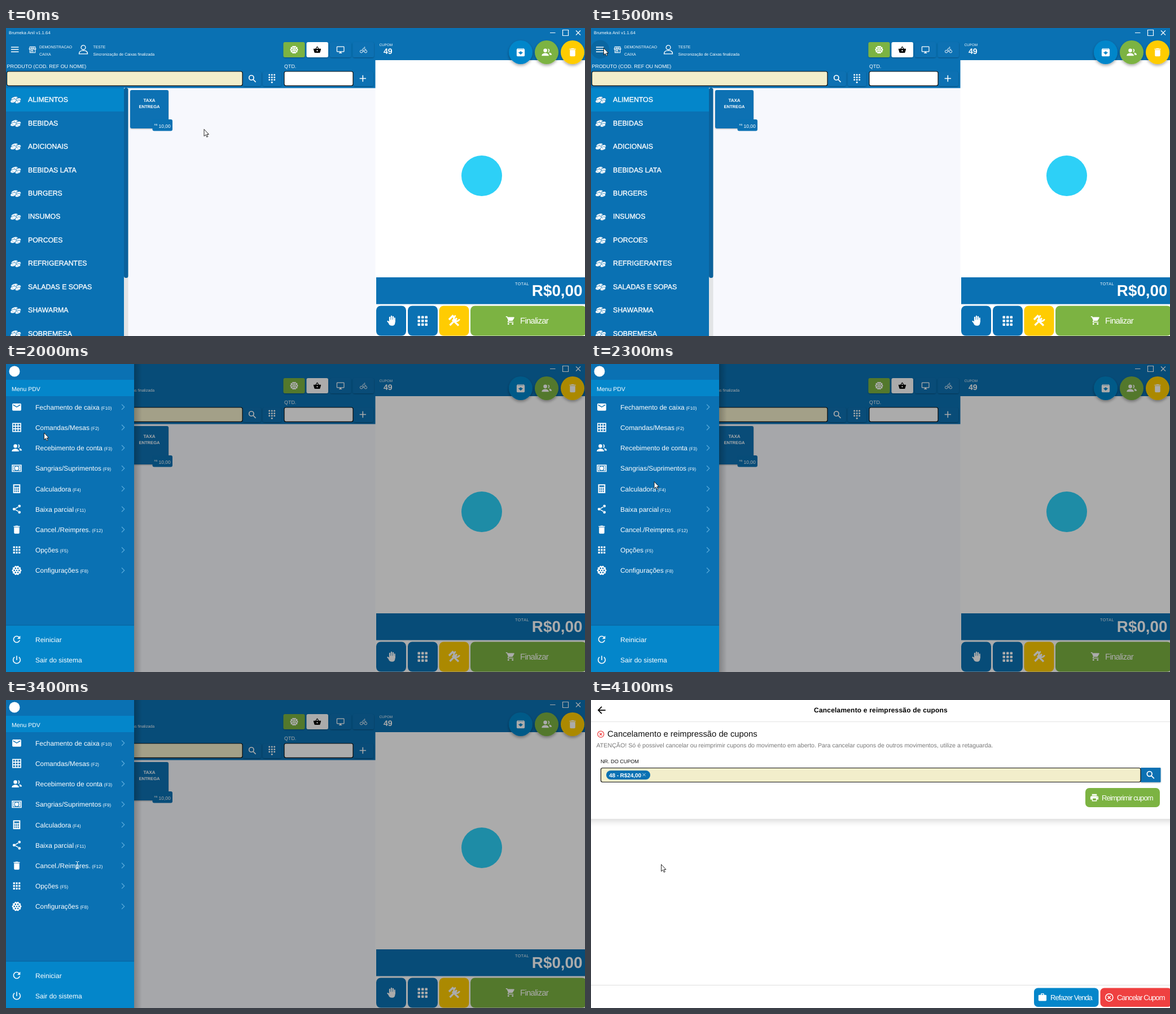
An HTML page that plays this animation: 1026 by 546 pixels, repeating every 4.8 s.

```html
<!DOCTYPE html>
<html lang="pt">
<head>
<meta charset="utf-8">
<title>PDV</title>
<style>
html, body { margin: 0; width: 100%; height: 100%; overflow: hidden; background: #fff; }
svg { display: block; width: 100%; height: 100%; font-family: "Liberation Sans", Arial, sans-serif; text-rendering: geometricPrecision; }
text { white-space: pre; }
</style>
</head>
<body>
<svg id="stage" viewBox="0 0 1026 546" xmlns="http://www.w3.org/2000/svg"></svg>
<script>
const BLUE = '#0a71b3', LIGHT = '#0486ca', GREEN = '#7cb342', YELLOW = '#ffcc02', RED = '#ef4040', CREAM = '#f2eecb';

const tag = (name, attrs, body = '') =>
  `<${name} ${Object.entries(attrs).map(([k, v]) => `${k}="${v}"`).join(' ')}>${body}</${name}>`;
const rect = (x, y, width, height, fill, rx = 0, more = {}) => tag('rect', { x, y, width, height, fill, rx, ...more });
const circle = (cx, cy, r, fill, more = {}) => tag('circle', { cx, cy, r, fill, ...more });
const line = (d, stroke, width = 1, more = {}) => tag('path', { d, stroke, 'stroke-width': width, fill: 'none', ...more });
const label = (s, x, y, size, more = {}) => tag('text', { x, y, 'font-size': size, fill: '#fff', ...more }, s);
const group = (id, body) => tag('g', { id }, body);
const range = (n, f) => Array.from({ length: n }, (_, i) => f(i));
const bold = { 'font-weight': 700 };
const middle = { 'text-anchor': 'middle' };
const raised = { filter: 'url(#raised)' };
const spaced = v => ({ 'letter-spacing': v });

// Icons live in a 24 x 24 box: [path, stroke width when outlined]
const dot = (x, y, r) => `M${x - r} ${y}a${r} ${r} 0 1 0 ${2 * r} 0a${r} ${r} 0 1 0 ${-2 * r} 0z`;
const box = (x, y, w, h) => `M${x} ${y}h${w}v${h}h${-w}z`;
const polar = (r, a) => [12 + r * Math.cos(a), 12 + r * Math.sin(a)];
const wheelEdge = 'M' + range(80, i => {
  const a = i * Math.PI / 40;
  return polar(10 + 0.8 * Math.cos(10 * a), a).map(v => v.toFixed(2)).join(' ');
}).join('L') + 'z';
const wheelHoles = range(6, i => dot(...polar(5.4, i * Math.PI / 3), 1.7)).join('');

const icons = {
  menu: ['M3 6.5h18M3 12h18M3 17.5h18', 2],
  search: [dot(9.5, 9.5, 5.5) + 'M14 14l5.8 5.8', 2.3],
  plus: ['M12 4v16M4 12h16', 2.2],
  close: ['M5 5l14 14M19 5L5 19', 2],
  mail: ['M4 4h16q2 0 2 2v12q0 2-2 2H4q-2 0-2-2V6q0-2 2-2zM20 8V6l-8 5-8-5v2l8 5z'],
  table: ['M3 3h18v18H3zM9 3v18M15 3v18M3 9h18M3 15h18', 2],
  people: [dot(9, 8, 4.2) + 'M1 20c0-4 4-6 8-6s8 2 8 6zM14.5 4a4 4 0 1 1 0 8a6 6 0 0 0 0-8zM18.6 18H23.5c0-3.5-3-4.8-6.5-5c1.2 1.2 1.8 2.6 1.6 5z'],
  cash: [box(1, 4, 22, 16) + box(3, 6, 18, 12) + 'M4 7h4q-3 5 0 10H4zM20 7h-4q3 5 0 10h4z' + dot(12, 12, 4.2)],
  calculator: [box(4, 2, 16, 20) + box(6.5, 4.5, 11, 3.5) + range(9, i => box(6.5 + i % 3 * 4, 10 + (i / 3 | 0) * 3.6, 2.6, 2.2)).join('')],
  share: [dot(18, 5, 3) + dot(6, 12, 3) + dot(18, 19, 3) + 'M8 10.3l8-4.6.9 1.6-8 4.6zM8.9 12.1l8 4.6-.9 1.6-8-4.6z'],
  trash: ['M6 7h12v12q0 2-2 2H8q-2 0-2-2zM19 4h-3.5l-1-1h-5l-1 1H5v2h14z'],
  apps: [range(9, i => box(4 + i % 3 * 6, 4 + (i / 3 | 0) * 6, 4, 4)).join('')],
  wheel: [wheelEdge + wheelHoles + dot(12, 12, 1.5)],
  refresh: ['M17.65 6.35A8 8 0 1 0 19.73 14h-2.08A6 6 0 1 1 16.22 7.78L13 11h7V4z'],
  power: ['M12 3v10M7 6a8 8 0 1 0 10 0', 2],
  basket: ['M17.2 9L12.8 2.4q-.8-.8-1.6 0L6.8 9H2q-1.2 0-1 1.3l2.6 9.2Q4 21 5.5 21h13q1.5 0 1.9-1.5L23 10.3Q23.200 9 22 9zM9 9l3-4.4L15 9z' + dot(12, 15, 2)],
  monitor: ['M3 2h18q2 0 2 2v12q0 2-2 2h-7v2h2v2H8v-2h2v-2H3q-2 0-2-2V4q0-2 2-2zM3 4v12h18V4z'],
  bike: [dot(5.5, 17, 4) + dot(18.5, 17, 4) + dot(15.5, 4.5, 1) + 'M12 18v-5l-3.500-2.500 4.500-4 3 4h4', 1.6],
  archive: ['M6 3h12l1.200.5 1.800 2.500V19q0 2-2 2H5q-2 0-2-2V6L4.800 3.500zM12 17.500l5.500-5.500H14v-2h-4v2H6.500zM5.100 5.200h13.800l-1-1.200H6z'],
  person: [dot(12, 7, 5.2) + 'M2 22c0-6 4-8 10-8s10 2 10 8z', 1.8],
  store: ['M4 3h16l2 7H2zM4 10v11h16V10M8 3v7M12 3v7M16 3v7M8 21v-7h5v7', 1.9],
  cart: [dot(7, 20, 2) + dot(17, 20, 2) + 'M1 2h3.300l.9 2H20q1.300.2.900 1.500L17.300 12q-.6 1-1.800 1H8.100L7.200 15H19v2H7q-2.800-.5-1.700-3l1.300-2.400L3 4H1z'],
  print: ['M19 8H5q-3 0-3 3v6h4v4h12v-4h4v-6q0-3-3-3zM6 3h12v4H6z' + box(8, 14, 8, 5) + dot(19, 11, 1)],
  work: ['M20 6h-4V4q0-2-2-2h-4q-2 0-2 2v2H4q-2 0-2 2v11q0 2 2 2h16q2 0 2-2V8q0-2-2-2zM10 6V4h4v2z'],
  back: ['M20 12H5.500M12 4.700L4.700 12l7.300 7.300', 2.1],
  cancel: [dot(12, 12, 8.8) + 'M8.500 8.500l7 7M15.500 8.500l-7 7', 2]
};

function icon(name, cx, cy, size, color = '#fff') {
  const [d, w] = icons[name];
  const paint = w ? { fill: 'none', stroke: color, 'stroke-width': w } : { fill: color, 'fill-rule': 'evenodd' };
  return tag('path', { d, ...paint, transform: `translate(${cx - size / 2} ${cy - size / 2}) scale(${size / 24})` });
}

const hand = tag('g', { transform: 'translate(683 519)', stroke: '#fff', 'stroke-linecap': 'round', 'stroke-width': 2.3, fill: '#fff' },
  '<path d="M-3-1v-5M0-1v-7M3-1v-6M5.700 2v-6.500M-3.500 4l-3-3" /><path d="M-3-1h8.700v4q0 5-4.500 5t-5.700-4z" stroke-width="1.500" />');

const tools = tag('g', { transform: 'translate(794 519)', fill: 'none', stroke: '#fff' },
  line('M-7.500 8L5-4.500', '#fff', 3.2) + line('M3-9a5 5 0 1 0 6.500 6', '#fff', 2.8) +
  line('M-3-2L8 8.500', '#fff', 3.2) + line('M-9-2L-2.500-8.500L1-5', '#fff', 3.4));

const loaves = y => tag('g', { transform: `translate(17 ${y})`, fill: '#fff', stroke: BLUE, 'stroke-width': 0.7 },
  [[-2, -2.7, 6, 3], [5, -0.2, 4.6, 3], [-4, 1.8, 5.4, 3.2], [4, 3.300, 5, 2.8]].map(([cx, cy, rx, ry]) =>
    tag('ellipse', { cx, cy, rx, ry, transform: `rotate(-18 ${cx} ${cy})` })).join('') +
  '<path d="M-3-4l2 2M1-4.500l1.500 2M-6 1l2 2M3 2.500l2 2" fill="none" />');

const button = (x, y, w, h, fill, r = 3) => rect(x, y, w, h, fill, r, raised);
const field = (x, y, w, h, fill) => rect(x, y, w, h, fill, 3, { stroke: '#111', 'stroke-width': 1.2 });

function topBar() {
  const search = range(10, i => circle(i < 9 ? 466.7 + i % 3 * 4.500 : 471.2, 83 + (i / 3 | 0) * 4.400, 1.500, '#fff')).join('');
  return rect(0, 0, 1026, 57, BLUE) + rect(0, 56, 654.5, 50.5, BLUE) +
    label('Brumeka Anil v1.1.64', 5, 11, 7.6, spaced(0.1)) +
    line('M964 8.500h9.500M986.500 3.500h10v10h-10zM1010 4.500l8 8M1018 4.500l-8 8', '#fff', 1.2) +
    circle(16, 38, 16.5, '#000', { id: 'hover', opacity: 0.1 }) +
    icon('menu', 15.7, 38, 18) + icon('store', 47, 38.5, 14) + icon('person', 137, 38.3, 18) +
    label('DEMONSTRACAO', 59, 36.3, 6.8) + label('CAIXA', 59, 49, 6.9) +
    label('TESTE', 154.5, 36.3, 6.8) + label('Sincronização de Caixas finalizada', 154.5, 49, 7) +
    button(491.5, 25, 38, 27, GREEN) + button(532.5, 25, 38.500, 27, '#fff') +
    button(574, 25, 37.5, 27, BLUE) + button(614.5, 25, 37.5, 27, BLUE) +
    icon('wheel', 510.5, 38.5, 16) + icon('basket', 551.5, 38.5, 14.5, '#000') +
    icon('monitor', 592.7, 38.7, 15) + icon('bike', 633.5, 38.7, 14) +
    label('CUPOM', 661.5, 31.5, 6.3) + label('49', 669, 46, 14, bold) +
    label('PRODUTO (COD. REF OU NOME)', 1.5, 71, 8.95) + label('QTD.', 493, 71, 8.95) +
    button(420, 77, 32, 26, BLUE) + button(455, 77, 33, 26, BLUE) + button(616, 77, 35, 26, BLUE) +
    field(1.5, 77, 417.5, 25.3, CREAM) + field(493, 77, 122, 25.3, '#fff') +
    icon('search', 436.7, 90, 18) + search + icon('plus', 632.3, 89.5, 17);
}

function categories() {
  const names = ['ALIMENTOS', 'BEBIDAS', 'ADICIONAIS', 'BEBIDAS LATA', 'BURGERS', 'INSUMOS', 'PORCOES',
    'REFRIGERANTES', 'SALADAS E SOPAS', 'SHAWARMA', 'SOBREMESA'];
  return rect(0, 106, 209, 440, BLUE) + rect(0, 106.5, 209, 41.5, LIGHT) +
    names.map((s, i) => loaves(127.5 + i * 41.45) +
      label(s, 39, 131.2 + i * 41.45, 12.3, { stroke: '#fff', 'stroke-width': 0.35 })).join('') +
    rect(209, 106, 7.5, 440, '#e2e4e6') + rect(209, 106, 7.5, 337, '#0b629c', 3.500);
}

function salePage() {
  const tile = button(220, 110, 68, 68, BLUE) + label('TAXA', 254, 131.3, 8, { ...bold, ...middle }) +
    label('ENTREGA', 254, 142, 7.6, { ...bold, ...middle }) + rect(259.5, 162, 35.500, 20.5, BLUE, 3) +
    label('R$', 262.5, 172.5, 4.500) + label('10,00', 270.5, 176.7, 8.5);
  const rounds = [[912, LIGHT, 'archive'], [958, GREEN, 'people'], [1004, YELLOW, 'trash']].map(([x, fill, name]) =>
    circle(x, 43, 21, fill, { filter: 'url(#lifted)' }) + icon(name, x, 43, 19)).join('');
  const pad = range(9, i => rect(729.5 + i % 3 * 6.5, 510.5 + (i / 3 | 0) * 6.5, 4.500, 4.500, '#fff', 1)).join('');
  return rect(0, 0, 1026, 546, '#fff') + rect(216, 106, 438.5, 440, '#f7f8fd') +
    topBar() + categories() + tile + rounds +
    circle(843, 262, 36, '#2dd0f7') +
    rect(656, 442, 370, 47.5, BLUE) + label('TOTAL', 902, 456, 7.2, spaced(0.5)) +
    label('R$0,00', 1021.5, 475, 27.8, { ...bold, 'text-anchor': 'end' }) +
    rect(656, 492.5, 53, 53, BLUE, 8) + rect(712, 492.5, 53, 53, BLUE, 8) +
    rect(767.5, 492.5, 53, 53, YELLOW, 8) + rect(823, 492.5, 206, 53, GREEN, 8) +
    hand + pad + tools + icon('cart', 894, 518.5, 18) + label('Finalizar', 911, 524, 15, spaced(-0.74));
}

function drawer() {
  const items = [['Fechamento de caixa', 'F10', 'mail'], ['Comandas/Mesas', 'F2', 'table'], ['Recebimento de conta', 'F3', 'people'],
    ['Sangrias/Suprimentos', 'F9', 'cash'], ['Calculadora', 'F4', 'calculator'], ['Baixa parcial', 'F11', 'share'],
    ['Cancel./Reimpres.', 'F12', 'trash'], ['Opções', 'F5', 'apps'], ['Configurações', 'F8', 'wheel']];
  const rows = items.map(([name, key, pic], i) => {
    const y = 76.3 + i * 36.2;
    return icon(pic, 19, y, 19) + line(`M205 ${y - 4.700}l4.700 4.700l-4.700 4.700`, '#59aada', 1.3) +
      label(name + tag('tspan', { dx: 2.5, 'font-size': 8 }, `(${key})`), 52, y + 4.400, 11.9);
  }).join('');
  return rect(0, 0, 1026, 546, '#000', 0, { opacity: 0.33 }) +
    rect(227, 0, 14, 546, 'url(#edge)') + rect(0, 0, 227, 546, BLUE) +
    circle(15, 13, 9.5, '#fff') + rect(0, 28, 227, 29, LIGHT) + label('Menu PDV', 10, 47.5, 10.5) + rows +
    rect(0, 463, 227, 83, LIGHT) + rect(0, 462.5, 227, 1.2, '#0a649f') +
    icon('refresh', 19, 488, 19) + label('Reiniciar', 52, 492.5, 12) +
    icon('power', 19, 524.3, 19) + label('Sair do sistema', 52, 528.7, 12);
}

function couponPage() {
  const tight = spaced(-0.93);
  const chip = rect(27, 125, 78, 16, BLUE, 8) + label('48 - R$24,00', 32, 137, 10, { ...bold, ...spaced(-0.08) }) +
    icon('close', 94, 132.500, 9);
  return rect(0, 0, 1026, 546, '#fff') +
    rect(-20, 30, 1066, 180.500, '#fff', 0, { filter: 'url(#card)' }) + rect(0, 0, 1026, 38, '#fff') +
    rect(0, 38, 1026, 1, '#e4e4e4') + icon('back', 19, 18, 20, '#000') +
    label('Cancelamento e reimpressão de cupons', 513.5, 21.7, 12, { ...bold, ...middle, ...spaced(0.19), fill: '#000' }) +
    icon('cancel', 17.3, 60.7, 15, RED) +
    label('Cancelamento e reimpressão de cupons', 29, 64.7, 14.8, { fill: '#111' }) +
    label('ATENÇÃO! Só é possivel cancelar ou reimprimir cupons do movimento em aberto. Para cancelar cupons de outros movimentos, utilize a retaguarda.',
      9.5, 84.3, 10.66, { fill: '#777' }) +
    label('NR. DO CUPOM', 17, 112.3, 9.05, { fill: '#111' }) +
    button(974, 120, 35.5, 25.7, BLUE, 1) + field(17.5, 120.5, 956.5, 25, CREAM) + icon('search', 991.7, 133, 19) +
    rect(876, 156, 132, 34, GREEN, 7) + icon('print', 892, 173, 17) + label('Reimprimir cupom', 905, 177.5, 13, tight) +
    rect(0, 505, 1026, 1, '#dedede') +
    rect(785, 510.500, 114.5, 33.500, LIGHT, 7) + icon('work', 800, 527, 17) + label('Refazer Venda', 814, 532, 13, tight) +
    rect(902.5, 510.500, 126.5, 33.500, RED, 7) + icon('cancel', 918.3, 527.300, 18) + label('Cancelar Cupom', 932, 532, 13, tight) +
    group('chip', chip);
}

const shadow = (id, dy, blur, alpha) => tag('filter', { id, x: '-30%', y: '-30%', width: '160%', height: '170%' },
  tag('feDropShadow', { dx: 0, dy, stdDeviation: blur, 'flood-color': '#000', 'flood-opacity': alpha }));

const stage = document.getElementById('stage');
stage.innerHTML = '<defs>' + shadow('raised', 1, 1, 0.3) + shadow('lifted', 2.5, 2.5, 0.35) + shadow('card', 4, 6, 0.16) +
  '<linearGradient id="edge"><stop stop-color="#000" stop-opacity=".22"/><stop offset="1" stop-color="#000" stop-opacity="0"/></linearGradient></defs>' +
  group('sale', salePage()) + group('drawer', drawer()) + group('coupon', couponPage()) +
  group('arrow', tag('path', { d: 'M.5.500v12.300l2.800-2.600 2 4.200 1.900-.9-1.900-4h3.600z', fill: '#fff', stroke: '#111', 'stroke-width': 0.9 })) +
  group('beam', line('M123.500 286.500h2l1 1l1-1h2M126.500 287v11.500M123.500 299h2l1-1l1 1h2', '#fff', 1));

const part = Object.fromEntries(['drawer', 'coupon', 'chip', 'hover', 'arrow', 'beam'].map(id => [id, document.getElementById(id)]));
const show = (el, on) => el.setAttribute('visibility', on ? 'visible' : 'hidden');

const LOOP = 4800, STEP = 100;
// Pointer legs: time of first step, number of steps, end point
const legs = [[300, 6, 49, 27], [900, 4, 22, 35], [1800, 6, 111.5, 208], [2400, 2, 117.5, 233], [2700, 6, 124, 285.5]];
const ease = p => p * p * (3 - 2 * p);

function pointer(t) {
  let x = 350.5, y = 179;
  for (const [start, steps, toX, toY] of legs) {
    const p = ease(Math.min(1, Math.max(0, (t - start + STEP) / (steps * STEP))));
    x += (toX - x) * p;
    y += (toY - y) * p;
  }
  return t >= 3900 ? [124, 291] : [Math.round(x * 2) / 2, Math.round(y * 2) / 2];
}

function draw(ms) {
  const t = Math.floor(ms % LOOP / STEP) * STEP;
  const typing = t >= 3300 && t < 3900;
  show(part.drawer, t >= 1600 && t < 3900);
  show(part.coupon, t >= 3900);
  show(part.chip, t >= 4100);
  show(part.hover, t >= 1100 && t < 1600);
  show(part.beam, typing);
  show(part.arrow, !typing);
  part.arrow.setAttribute('transform', `translate(${pointer(t).join(' ')})`);
}

const begin = performance.now();
function tick() {
  draw(performance.now() - begin);
  requestAnimationFrame(tick);
}
tick();
</script>
</body>
</html>
```
